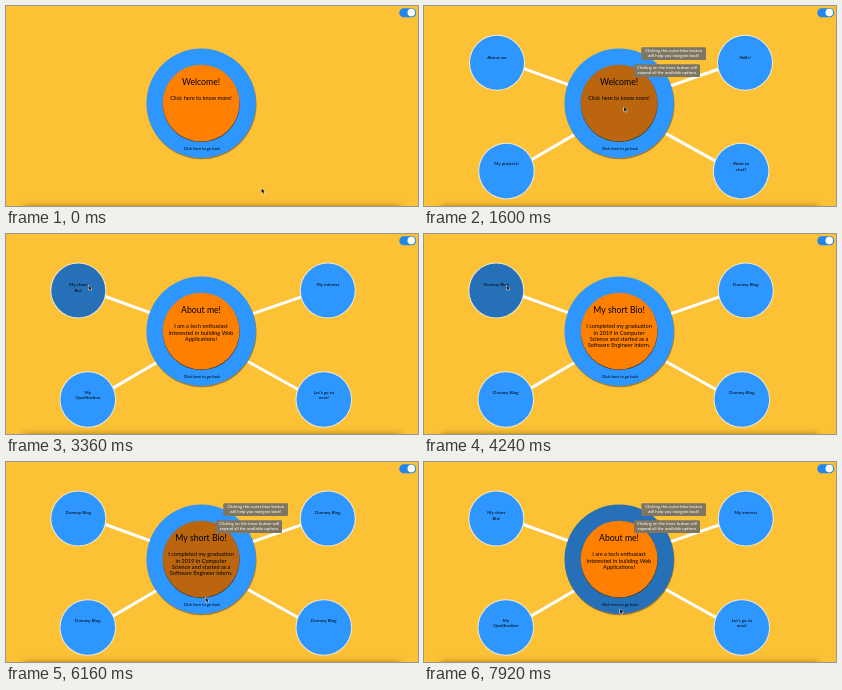
Recreate the animation shown at these times as an HTML page with a canvas. Size 412 px wide and 200 px high, loop 8000 ms.

```html
<!DOCTYPE html>
<html lang="en">
<head>
<meta charset="utf-8">
<title>Radial menu</title>
<style>
html, body { margin: 0; width: 100%; height: 100%; overflow: hidden; background: #fcc135; }
canvas { display: block; width: 412px; height: 200px; }
</style>
</head>
<body>
<canvas id="stage"></canvas>
<script>
const W = 412, H = 200, LOOP = 8000;
const canvas = document.getElementById('stage');
const ctx = canvas.getContext('2d');
const ratio = window.devicePixelRatio || 1;
canvas.width = W * ratio;
canvas.height = H * ratio;

const BLUE = [46, 150, 255], NAVY = [38, 112, 184];
const ORANGE = [255, 128, 0], BROWN = [187, 102, 14];
const HUB = { x: 195.2, y: 97.3 };

// Node centre, radius, and the line's ends at the node and at the hub
const nodes = [
  { x: 72.3, y: 56.5, r: 27.3, line: [98, 62, 146, 79.3] },
  { x: 321.8, y: 56.5, r: 27.3, line: [297, 62.3, 244, 80.7] },
  { x: 81.8, y: 165.5, r: 27.6, line: [106, 154.6, 152, 127.8] },
  { x: 317.8, y: 165.5, r: 27.6, line: [293, 156, 240, 126.5] }
];

const pages = [
  {
    from: 0, title: 'Welcome!', body: ['Click here to know more!'],
    labels: [['About me'], ['Skills!'], ['My projects!'], ['Want to', 'chat?']]
  },
  {
    from: 3040, title: 'About me!',
    body: ['I am a tech enthusiast', 'interested in building Web', 'Applications!'],
    labels: [['My short', 'Bio!'], ['My interest'], ['My', 'Qualification'], ["Let's go to", 'next!']]
  },
  {
    from: 4160, title: 'My short Bio!',
    body: ['I completed my graduation', 'in 2019 in Computer', 'Science and started as a', 'Software Engineer Intern.'],
    labels: Array(4).fill(['Dummy Blog'])
  }
];
const views = [...pages, { ...pages[1], from: 6960 }];

const tips = [
  { x: 217.3, y: 41.2, w: 64.7, text: ['Clicking this outer blue button', 'will help you navigate back!'] },
  { x: 210, y: 58.2, w: 66, text: ['Clicking on the inner button will', 'expand all the available options'] }
];

// time, x, y of the pointer tip
const path = [
  [0, 255.5, 182.5], [80, 255.5, 182.5], [400, 200, 101], [2080, 200, 101],
  [2480, 142.5, 91], [2800, 82.5, 51.5], [5440, 82.5, 51.5],
  [6160, 199.5, 135.5], [6480, 196, 147], [8000, 196, 147]
];

const clamp = v => Math.max(0, Math.min(1, v));
const mix = (a, b, k) => a + (b - a) * k;
const smooth = k => k * k * (3 - 2 * k);
const easeOut = k => 1 - (1 - k) ** 3;
const ramp = (t, start, length) => clamp((t - start) / length);
const pulse = (t, on, off, fade = 160) => ramp(t, on, fade) - ramp(t, off, fade);
const blend = (a, b, k) => `rgb(${a.map((v, i) => Math.round(mix(v, b[i], k)))})`;

function disc(x, y, r, fill) {
  ctx.beginPath();
  ctx.arc(x, y, r, 0, Math.PI * 2);
  ctx.fillStyle = fill;
  ctx.fill();
}

function write(lines, x, y, size, pitch, color = '#000') {
  ctx.font = `${size}px Lato, sans-serif`;
  ctx.fillStyle = color;
  lines.forEach((line, i) => ctx.fillText(line, x, y + i * pitch));
}

function drawBackdrop() {
  ctx.fillStyle = '#fcc135';
  ctx.fillRect(0, 0, W, H);
  ctx.save();
  ctx.shadowColor = 'rgba(90, 55, 0, .6)';
  ctx.shadowBlur = 6 * ratio;
  ctx.fillStyle = '#b98a2a';
  ctx.fillRect(18, 200.5, 376, 8);
  ctx.restore();
}

function drawToggle() {
  ctx.beginPath();
  ctx.roundRect(393.3, 2.2, 17, 9, 4.5);
  ctx.fillStyle = '#2186f0';
  ctx.fill();
  disc(405.3, 6.6, 3.8, '#fff');
}

function drawNodes(t, labels) {
  const k = easeOut(ramp(t, 1240, 440));
  if (!k) return;
  const out = (p, q) => mix(q, p, k);
  ctx.strokeStyle = '#fff';
  ctx.lineWidth = 3;
  for (const { line: [x1, y1, x2, y2] } of nodes) {
    ctx.beginPath();
    ctx.moveTo(out(x1, HUB.x), out(y1, HUB.y));
    ctx.lineTo(out(x2, HUB.x), out(y2, HUB.y));
    ctx.stroke();
  }
  nodes.forEach((n, i) => {
    const x = out(n.x, HUB.x), y = out(n.y, HUB.y);
    const dark = i === 0 ? pulse(t, 2700, 5500) : 0;
    disc(x, y, n.r + .7, '#ece8dc');
    disc(x, y, n.r - .3, blend(BLUE, NAVY, dark));
    write(labels[i], x, y - (i < 2 ? 5.6 : 7.2), 4.5, 5.3);
  });
}

function drawHub(t, view) {
  const press = pulse(t, 640, 1280);
  const ring = pulse(t, 160, 1360) + ramp(t, 6240, 160);
  const core = pulse(t, 240, 2500) + pulse(t, 5800, 6240);
  ctx.save();
  ctx.translate(press, press * 1.5);
  const { x, y } = HUB;
  disc(x + .5, y + 1.1, 54.8, '#a87a2c');
  disc(x, y, 54.7, blend(BLUE, NAVY, ring));
  disc(x, y + .5, 38.5, '#3b352c');
  disc(x - .1, y - .2, 38.4, blend(ORANGE, BROWN, core));
  write([view.title], 195, 76.3, 8.7, 0);
  write(view.body, 195, 92.7, 5.6, 6.3);
  write(['Click here to go back'], 196, 142.3, 4, 0);
  ctx.restore();
  return press;
}

function drawTips(t, press) {
  ctx.save();
  ctx.globalAlpha = pulse(t, 200, 2520) + ramp(t, 5840, 160);
  ctx.translate(press, press * 1.5);
  for (const { x, y, w, text } of tips) {
    ctx.beginPath();
    ctx.roundRect(x, y, w, 12.8, 1);
    ctx.fillStyle = '#7f7662';
    ctx.fill();
    write(text, x + w / 2, y + 3.8, 4.3, 5, '#fff');
  }
  ctx.restore();
}

function drawPointer(t) {
  const i = path.findIndex(p => p[0] > t);
  const [t1, x1, y1] = path[i - 1], [t2, x2, y2] = path[i];
  const k = smooth((t - t1) / (t2 - t1));
  ctx.save();
  ctx.translate(mix(x1, x2, k), mix(y1, y2, k));
  ctx.beginPath();
  [[0, 0], [0, 4.4], [1.1, 3.5], [1.9, 5.2], [2.7, 4.8], [1.9, 3.2], [3.3, 3.1]]
    .forEach(p => ctx.lineTo(...p));
  ctx.closePath();
  ctx.fillStyle = '#111';
  ctx.strokeStyle = '#fff';
  ctx.lineWidth = 1;
  ctx.stroke();
  ctx.fill();
  ctx.restore();
}

function draw(t) {
  const view = views.findLast(v => v.from <= t);
  ctx.setTransform(ratio, 0, 0, ratio, 0, 0);
  ctx.textAlign = 'center';
  ctx.textBaseline = 'middle';
  drawBackdrop();
  drawToggle();
  drawNodes(t, view.labels);
  const press = drawHub(t, view);
  drawTips(t, press);
  drawPointer(t);
}

const start = performance.now();
function tick() {
  draw((performance.now() - start) % LOOP);
  requestAnimationFrame(tick);
}
tick();
</script>
</body>
</html>
```
